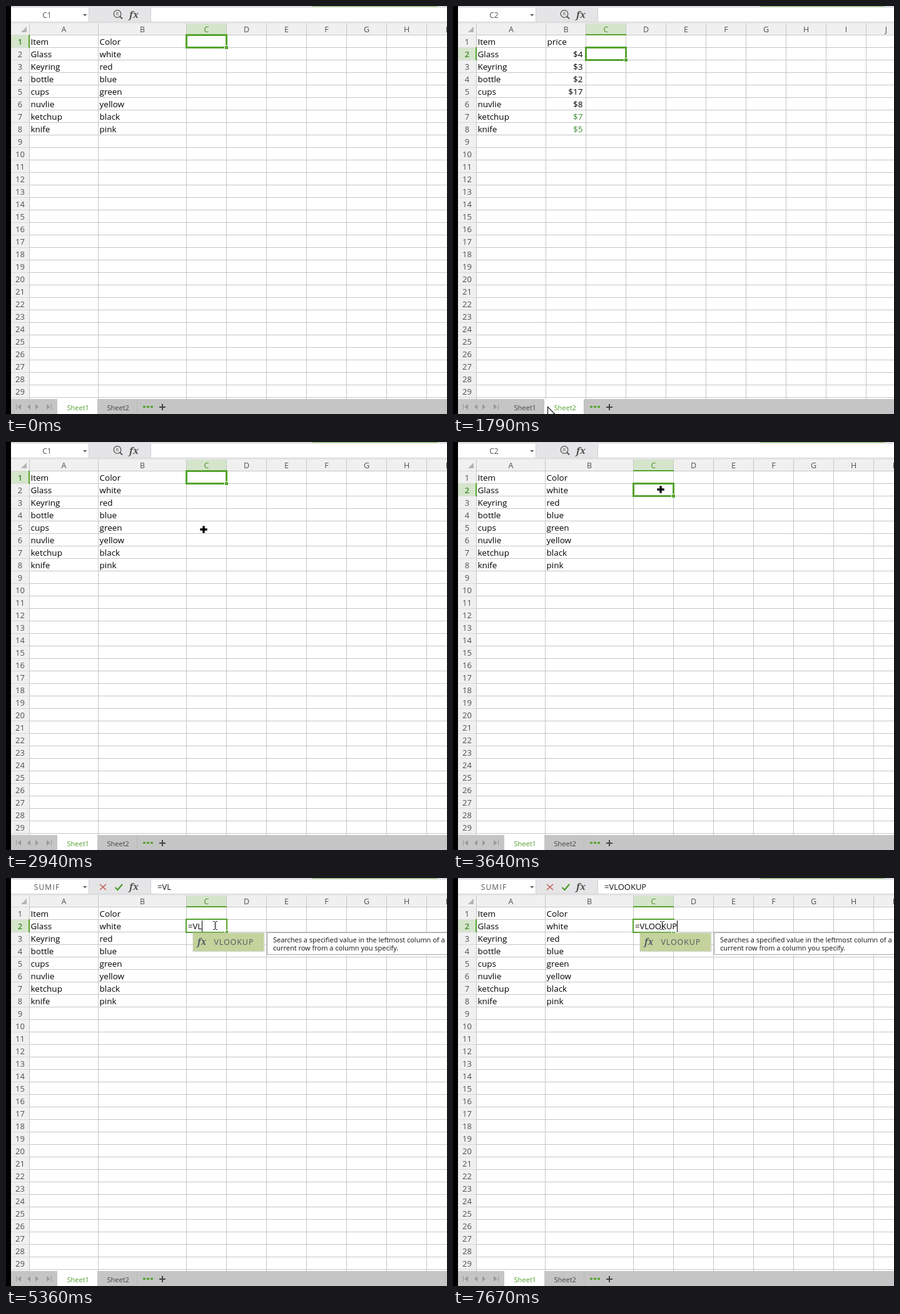
Write an HTML page that moves like this. It is 705 px wide and 653 px high and loops after 8000 ms.

```html
<!DOCTYPE html>
<html lang="en">
<head>
<meta charset="utf-8">
<title>Spreadsheet lookup</title>
<style>
html, body { margin: 0; width: 100%; height: 100%; overflow: hidden; background: #fff; }
svg { display: block; font-family: "Open Sans", "Noto Sans", sans-serif; }
</style>
</head>
<body>
<svg id="stage" width="705" height="653" viewBox="0 0 705 653"></svg>
<script>
const LOOP = 8000;
const GREEN = '#56a32f', DARK = '#4f4f4f', GRID = '#c6c6c6', HEAD = '#eff0ef', TINT = '#d5e5cb';
const stage = document.getElementById('stage');

const items = ['Item', 'Glass', 'Keyring', 'bottle', 'cups', 'nuvlie', 'ketchup', 'knife'];
const sheets = [
  { edges: [37, 147, 288], b: ['Color', 'white', 'red', 'blue', 'green', 'yellow', 'black', 'pink'] },
  { edges: [37, 148, 212], b: ['price', '$4', '$3', '$2', '$17', '$8', '$7', '$5'] }
];
for (const s of sheets) while (s.edges.at(-1) < 720) s.edges.push(s.edges.at(-1) + 64);

const rect = (x, y, w, h, fill, more = '') =>
  `<rect x="${x}" y="${y}" width="${w}" height="${h}" fill="${fill}" ${more}/>`;
const text = (x, y, str, size, fill, more = '') =>
  `<text x="${x}" y="${y}" font-size="${size}" fill="${fill}" ${more}>${str}</text>`;
const path = (d, fill, more = '') => `<path d="${d}" fill="${fill}" ${more}/>`;
const line = (d, color, width, more = '') => path(d, 'none', `stroke="${color}" stroke-width="${width}" ${more}`);
const MID = 'text-anchor="middle"';
const fx = (x, y, size, color) =>
  text(x, y, 'fx', size, color, 'font-family="Noto Serif, serif" font-style="italic" font-weight="600"');

// Last value whose start time has passed
const at = (t, list) => list.filter(e => t >= e[0]).at(-1)[1];

const typed = [[0, ''], [4360, '='], [4900, '=V'], [5280, '=VL'], [5510, '=VLO'], [5660, '=VLOO'],
  [5890, '=VLOOK'], [7440, '=VLOOKU'], [7670, '=VLOOKUP']];
const names = [[0, 'C1'], [1400, 'C2'], [2320, 'C1'], [3320, 'C2'], [4360, 'SUMIF']];
const caretOn = [[0, true], [6370, false], [6830, true], [7360, false], [7440, true]];

// start, end, steps, from, to, ease power
const moves = [
  [330, 920, 9, [403, 616], [191, 645], 1.6],
  [1090, 1091, 1, [191, 646], [191, 646], 1],
  [1620, 1940, 5, [184, 643], [128, 640], 1.3],
  [2110, 2111, 1, [127, 641], [127, 641], 1],
  [2320, 3020, 10, [140, 622], [333, 92], 1.6],
  [3100, 3170, 2, [331, 85], [329, 77], 1],
  [3640, 3641, 1, [332, 76], [332, 76], 1],
  [4360, 4361, 1, [334, 76], [334, 76], 1]
];

function pointer(t) {
  const m = moves.filter(e => t >= e[0]).at(-1);
  if (!m) return null;
  const [t0, t1, n, a, b, p] = m;
  const k = Math.min(n - 1, Math.floor((t - t0) / (t1 - t0) * (n - 1) + 1e-6));
  const u = n > 1 ? 1 - (1 - k / (n - 1)) ** p : 0;
  return a.map((v, i) => Math.round(v + (b[i] - v) * u));
}

function drawPointer([x, y], editing) {
  let art;
  if (editing) art = line('M-3-6.5H-.5M1.5-6.5H4M.5-6V6M-3 6.5H-.5M1.5 6.5H4', '#111', 1.2);
  else if (y < 629) art = path('M-2-6H2V-2H6V2H2V6H-2V2H-6V-2H-2Z', '#000', 'stroke="#fff" stroke-width=".6"');
  else art = path('M.5.5V17L4.5 13.2 7 19 9.5 18 7 12.2H12Z', '#fff', 'stroke="#000" stroke-width="1.1"');
  return `<g transform="translate(${x} ${y})">${art}</g>`;
}

function toolbar(name, formula) {
  let s = rect(8, 0, 697, 28, '#e5e5e7') + rect(8, 0, 697, 1, '#d3d3d3') + rect(490, 0, 200, 1, '#76b04f');
  s += rect(8, 3, 125, 22, '#fff') + rect(231, 3, 474, 22, '#fff');
  s += rect(132, 3, 1, 22, '#d2d2d2') + rect(231, 3, 1, 22, '#d2d2d2') + rect(8, 25, 697, 1, '#d6d6d6');
  s += text(65.5, 19, name, 12, '#555', MID + (formula ? ' letter-spacing="1.2"' : ''));
  s += path('M123 13H129.500L126.250 16.500Z', '#666');
  if (formula) {
    s += line('M150 10L160 19M160 10L150 19', '#bd5b4d', 1.5);
    s += line('M174.500 15L178.500 19 186 10', '#4d9a31', 2.2);
    s += text(242, 19, formula, 13, '#111');
  } else {
    s += `<circle cx="178" cy="12.500" r="5.800" fill="none" stroke="#555" stroke-width="1.300"/>`;
    s += line('M182 16.500L186 20.500', '#555', 2) + text(178, 15.300, 'R', 7, '#555', MID);
  }
  return s + fx(197, 19, 15, '#505050');
}

function grid(sheet, col, row) {
  const e = sheet.edges;
  let s = rect(8, 28, 697, 19, HEAD) + rect(8, 47, 29, 582, HEAD);
  s += path('M33 33V42H24Z', '#b4b4b4');
  s += rect(e[col], 28, e[col + 1] - e[col], 18, TINT) + rect(8, 27 + row * 20, 29, 19, TINT);
  for (const x of e) s += rect(x, 28, 1, 601, GRID);
  for (let i = 0; i < 30; i++) s += rect(8, 46 + i * 20, 29, 1, '#d8d8d8') + rect(37, 46 + i * 20, 668, 1, GRID);
  for (let i = 0; i < e.length - 1; i++)
    s += text((e[i] + e[i + 1]) / 2 + .5, 42, String.fromCharCode(65 + i), 12.5, i === col ? '#4b8d2c' : DARK, MID);
  for (let r = 1; r < 30; r++) {
    const on = r === row;
    s += text(22.5, 42 + r * 20, r, 13, on ? '#43862b' : DARK, MID + (on ? ' font-weight="600"' : ''));
  }
  s += rect(e[col], 45, e[col + 1] - e[col] + 1, 2, GREEN) + rect(36, 26 + row * 20, 2, 21, GREEN);
  items.forEach((item, i) => {
    const y = 62 + i * 20, b = sheet.b[i];
    s += text(39.5, y, item, 13.5, '#000');
    s += b[0] === '$'
      ? text(207.5, y, b, 13.5, i > 5 ? '#3b8a35' : '#000', 'text-anchor="end"')
      : text(e[1] + 2.5, y, b, 13.5, '#000');
  });
  return s;
}

function selection(x, row, editing) {
  const y = 26 + row * 20;
  const box = editing
    ? rect(x, y, 65, 21, '#fff', `stroke="${GREEN}" stroke-width="2"`)
    : rect(x + .5, y + .5, 64, 20, 'none', `stroke="${GREEN}" stroke-width="3"`);
  return box + rect(x + 61, y + 17, 7, 7, '#fff') + rect(x + 62, y + 18, 5, 5, GREEN);
}

function editor(formula, caret) {
  // Advance widths in em of the characters that get typed
  const em = { '=': .571, V: .595, L: .519, O: .779, K: .614, U: .728, P: .602 };
  const end = Math.round(291 + 13 * [...formula].reduce((sum, c) => sum + em[c], 0));
  const right = Math.max(352, end + 2);
  return rect(289, 67, right - 289, 19, '#fff') + text(291, 82, formula, 13, '#000') +
    (caret ? rect(end, 68, 1, 18, '#000') : '');
}

function popup(list, lines, right) {
  const h = list.length * 28.4;
  let s = rect(299, 88, 114, h + 1, '#fff', 'stroke="#d0d0d0"') + rect(299, 88, 113, 29, '#c4d29b');
  list.forEach((name, i) => {
    const y = 107 + i * 28.4;
    s += fx(306, y, 14, '#4c5a66') + text(332.5, y, name, 12.5, '#4c5a66', 'letter-spacing=".9"');
  });
  s += rect(417.5, 87.5, right - 418, lines.length * 13 + 9, '#fff', 'stroke="#a5a5a5"');
  lines.forEach((str, i) => s += text(427, 103 + i * 13, str, 11, '#111'));
  return s;
}

function tabs(active, p) {
  let s = rect(8, 629, 697, 24, '#c5c5c5');
  const ink = '#999';
  s += rect(16, 637, 1, 9, ink) + path('M24 637V646L18.500 641.500Z', ink);
  s += path('M39 637V646L34 641.500Z', ink) + path('M47 637V646L52 641.500Z', ink);
  s += path('M65 637V646L70.500 641.500Z', ink) + rect(72, 637, 1, 9, ink);
  for (let i = 0; i < 2; i++) {
    const x = 82 + i * 64;
    const hover = p && p[1] >= 629 && p[0] >= x && p[0] < x + 64;
    if (i === active) s += rect(x, 629, 64, 24, '#fff');
    else if (hover) s += rect(x, 629, 64, 24, '#dcdcdc');
    s += text(x + 15.5, 647, 'Sheet' + (i + 1), 11, i === active ? '#55a02f' : '#444');
  }
  s += rect(209, 630, 1, 23, '#bababa');
  for (let i = 0; i < 3; i++) s += rect(219 + i * 6, 640, 4, 3, GREEN);
  return s + rect(245, 641, 10, 2, '#444') + rect(249, 637, 2, 10, '#444');
}

function picture(t) {
  const second = t >= 1400 && t < 2250;
  const sheet = sheets[second ? 1 : 0];
  const row = second || t >= 3320 ? 2 : 1;
  const formula = at(t, typed), p = pointer(t);
  let s = rect(0, 0, 705, 653, '#fff') + toolbar(at(t, names), formula);
  s += grid(sheet, 2, row) + selection(sheet.edges[2], row, formula);
  if (formula) s += editor(formula, at(t, caretOn));
  if (t >= 5360) s += popup(['VLOOKUP'],
    ['Searches a specified value in the leftmost column of a', 'current row from a column you specify.'], 712);
  else if (t >= 5030) s += popup(['VALUE', 'VAR', 'VARA', 'VARP', 'VARPA', 'VDB', 'VLOOKUP'],
    ['Converts a text string to a numeric value.'], 652);
  s += tabs(second ? 1 : 0, p) + rect(0, 0, 8, 653, '#000');
  return p ? s + drawPointer(p, formula) : s;
}

let shown = '';
function tick() {
  const next = picture(performance.now() % LOOP);
  if (next !== shown) stage.innerHTML = shown = next;
  requestAnimationFrame(tick);
}
tick();
</script>
</body>
</html>
```
